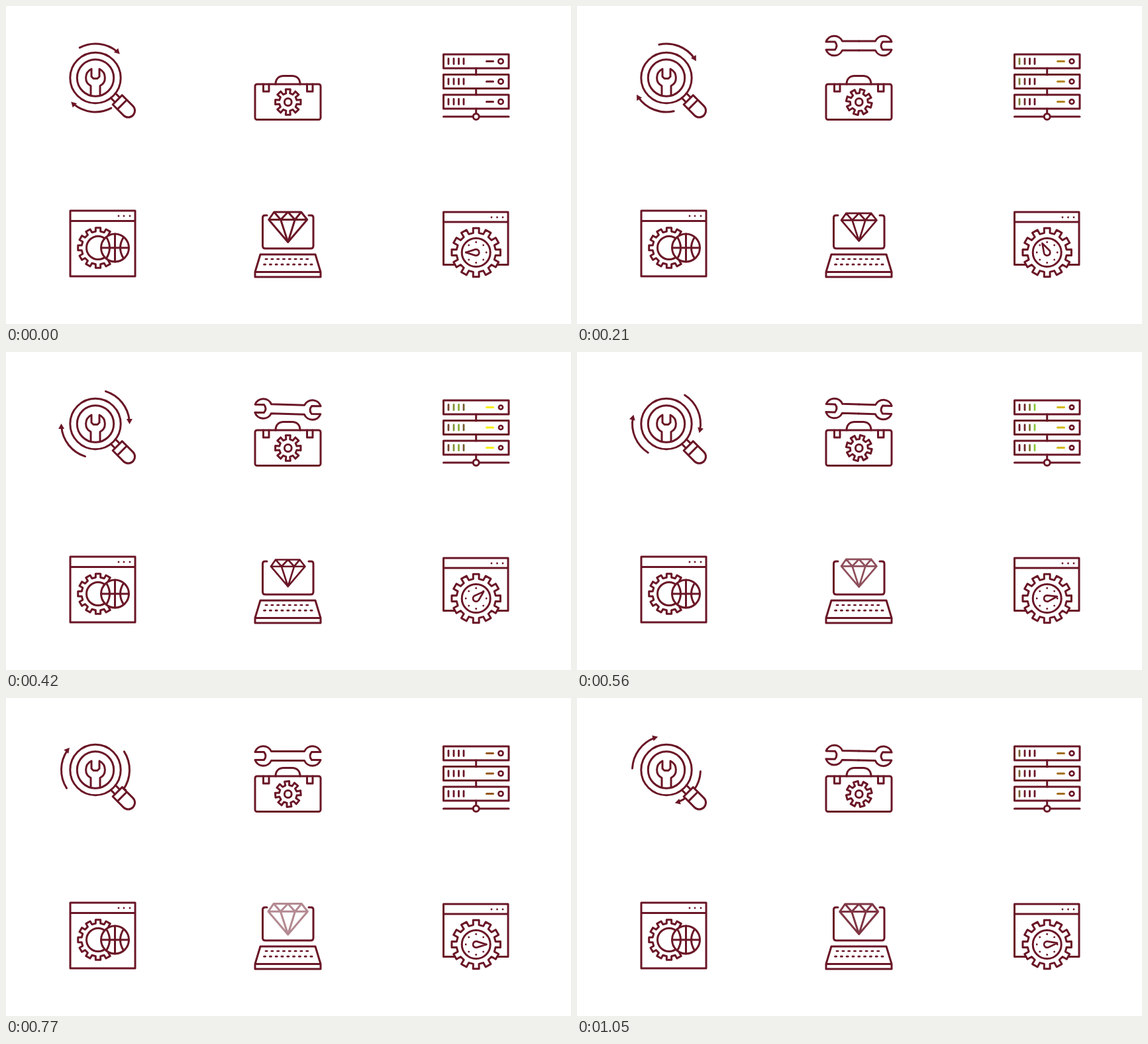
Animation of 853 by 480 pixels, one loop 1.12 s. Source, as an HTML page:

```html
<!DOCTYPE html>
<html>
<head>
<meta charset="utf-8">
<style>
html, body { margin: 0; width: 100%; height: 100%; overflow: hidden; background: #fff; }
svg { display: block; fill: none; stroke: #6a1626; stroke-width: 3; stroke-linecap: round; stroke-linejoin: round; }
.white { fill: #fff; }
.solid { fill: #6a1626; stroke: none; }
</style>
</head>
<body>
<svg id="stage" width="853" height="480" viewBox="0 0 853 480"></svg>
<script>
const LOOP = 1120, STEP = 70;
const KEY_TIMES = [0, 210, 420, 560, 700, 910, 1050];
const DARK = [106, 22, 38], GREEN = [140, 200, 62], YELLOW = [246, 238, 8];
const $ = id => document.getElementById(id);

const polar = (r, deg) => {
  const a = deg * Math.PI / 180;
  return (r * Math.cos(a)).toFixed(2) + ' ' + (r * Math.sin(a)).toFixed(2);
};

// Closed gear outline around 0,0 with one tooth pointing up.
function gear(teeth, outer, root) {
  const pitch = 360 / teeth, points = [];
  for (let i = 0; i < teeth; i++) {
    for (const [r, k] of [[root, -.28], [outer, -.23], [outer, .23], [root, .28]])
      points.push(polar(r, -90 + (i + k) * pitch));
  }
  return `<path class="white" d="M${points.join('L')}Z"/>`;
}

const dots = (xs, y) => xs.map(x => `<circle class="solid" cx="${x}" cy="${y}" r="1.4"/>`).join('');

const arrow = `<path d="M${polar(51.5, -117.5)}A51.5 51.5 0 0 1 ${polar(51.5, -50)}"/>
  <path class="solid" d="M51.5 1L47 -7H56Z" transform="rotate(-45.5)"/>`;

const magnifier = `<g transform="translate(135 108.5)">
  <g id="arrows">${arrow}<g transform="rotate(180)">${arrow}</g></g>
  <circle class="white" r="38.2"/><circle r="27.7"/>
  <path d="M-7 26V12C-17 7 -17 -8 -6 -13.5V-2L-3 1H3L6 -2V-13.5C17 -8 17 7 7 12V26"/>
  <g transform="rotate(45)">
    <path d="M38 -5H47M38 5H47"/>
    <path class="white" d="M47 -10H70A10 10 0 0 1 70 10H47ZM57 -10V10"/>
  </g>
</g>`;

const wrenchEnd = 'M0 -7H25A13.2 13.2 0 0 1 49.5 -6H36Q31 0 36 6H49.5A13.2 13.2 0 0 1 25 7H0';
const toolbox = `<g id="wrench"><path d="${wrenchEnd}"/><path d="${wrenchEnd}" transform="scale(-1 1)"/></g>
  <rect x="376" y="118" width="99" height="53.5" rx="3"/>
  <path d="M407 118C407 110 412 105.5 419 105.5H432C439 105.5 444 110 444 118M388.5 118V129H397V118M454.5 118V129H463V118"/>
  <g transform="translate(425.8 145)"><g id="cog">${gear(8, 19.5, 13.5)}</g><circle r="5.4"/></g>`;

const server = y => `<g transform="translate(0 ${y})">
  <rect x="660.5" y="-10.5" width="98.5" height="21"/>
  ${[668, 676, 683.5, 691].map(x => `<path class="bar" stroke-width="2.8" d="M${x} -4V4"/>`).join('')}
  <path class="dash" d="M725.5 0H735.5"/><circle class="lamp" cx="747" r="3.5" stroke-width="2.7"/></g>`;
const servers = [83.5, 114, 144.5].map(server).join('') +
  `<path d="M709.7 94V104M709.7 125V134M709.7 155V162M660.5 167H705M714.5 167H759"/>
  <circle cx="709.7" cy="167" r="4.5"/>`;

const sportWindow = `<path d="M97 309H195V408H97ZM97 324.5H195"/>${dots([170, 178, 187], 317)}
  <g transform="translate(139 365)">${gear(12, 30.5, 25)}<circle r="17.5"/></g>
  <g transform="translate(164.5 365)">
    <circle class="white" r="21"/>
    <path d="M-21 0H21M0 -21V21M-13 -16Q-3 0 -13 16M13 -16Q3 0 13 16"/>
  </g>`;

const laptop = `<path d="M394 316H391Q387.5 316 387.5 319.5V362Q387.5 366 391.5 366H460Q464 366 464 362V319.5Q464 316 460.5 316H457"/>
  <path d="M384 375H467L475 401.5V409H376V401.5ZM376 401.5H475"/>
  <path stroke-dasharray="2.2 6.6" stroke-width="2.7" d="M392 382H460M389.5 390.2H463"/>
  <path id="gem" d="M-29 -11L-21 -22.5H20L29 -11L0 23ZH29M-21 -22.5L-11 -11L0 -22.5L10.5 -11L20 -22.5M-11 -11L0 23L10.5 -11"/>`;

const dialDots = Array.from({ length: 8 }, (_, i) =>
  `<circle class="solid" cx="15.5" r="1.4" transform="rotate(${i * 45})"/>`).join('');
const dialWindow = `<path d="M660.5 311H758V390.5H660.5ZM660.5 326H758"/>${dots([733, 741.5, 750], 319)}
  <g transform="translate(709.7 372)">${gear(12, 37, 29.7)}<circle r="21.5"/>${dialDots}
    <path id="needle" class="white" stroke-width="2.7" d="M15.5 0L1 -4.6A4.7 4.7 0 1 0 1 4.6Z"/>
  </g>`;

$('stage').innerHTML = magnifier + toolbox + servers + sportWindow + laptop + dialWindow;
const bars = document.querySelectorAll('.bar');
const dashes = document.querySelectorAll('.dash');
const lamps = document.querySelectorAll('.lamp');

// Linear interpolation of values placed at KEY_TIMES.
function keyed(t, values) {
  let i = 0;
  while (i < KEY_TIMES.length - 2 && t > KEY_TIMES[i + 1]) i++;
  const k = (t - KEY_TIMES[i]) / (KEY_TIMES[i + 1] - KEY_TIMES[i]);
  return values[i] + (values[i + 1] - values[i]) * k;
}

const mix = (a, b, k) => `rgb(${a.map((v, i) => Math.round(v + (b[i] - v) * k))})`;

function draw(t) {
  const phase = keyed(t, [0, 2, 6, 8, 10, 14, 16]);
  const spin = `rotate(${phase * 7.5})`;
  $('arrows').setAttribute('transform', spin);
  $('cog').setAttribute('transform', spin);

  const y = keyed(t, [60, 60, 86.5, 86, 87.5, 87.5, 87]);
  const tilt = keyed(t, [0, 0, 1.5, 1.6, 0, 0, 1.3]);
  $('wrench').setAttribute('transform', `translate(425.5 ${y}) rotate(${tilt})`);
  $('wrench').setAttribute('opacity', keyed(t, [0, 1, 1, 1, 1, 1, 1]));

  bars.forEach((bar, i) => {
    const peak = 3.5 + (i % 4) * 1.5;
    const gap = Math.min(Math.abs(phase - peak), Math.abs(phase - peak - 14.5));
    bar.style.stroke = mix(DARK, GREEN, Math.max(0, 1 - gap / 3.3));
  });
  const glow = keyed(t, [0, .5, 1, .75, .45, 0, .4]);
  dashes.forEach(dash => dash.style.stroke = mix(DARK, YELLOW, glow));
  lamps.forEach(lamp => lamp.setAttribute('r', 3.7 - .7 * glow));

  const size = keyed(t, [1, .92, .89, .92, 1.02, 1.03, 1]);
  $('gem').setAttribute('transform', `translate(425.7 333.5) scale(${size})`);
  $('gem').setAttribute('opacity', keyed(t, [1, 1, 1, .75, .5, .5, .86]));

  const turn = keyed(t, [180, 242, 318, 349, 360, 360, 352]);
  $('needle').setAttribute('transform', `rotate(${turn})`);
}

const start = performance.now();
function tick() {
  const t = (performance.now() - start) % LOOP;
  draw(Math.floor(t / STEP) * STEP);
  requestAnimationFrame(tick);
}
tick();
</script>
</body>
</html>
```
